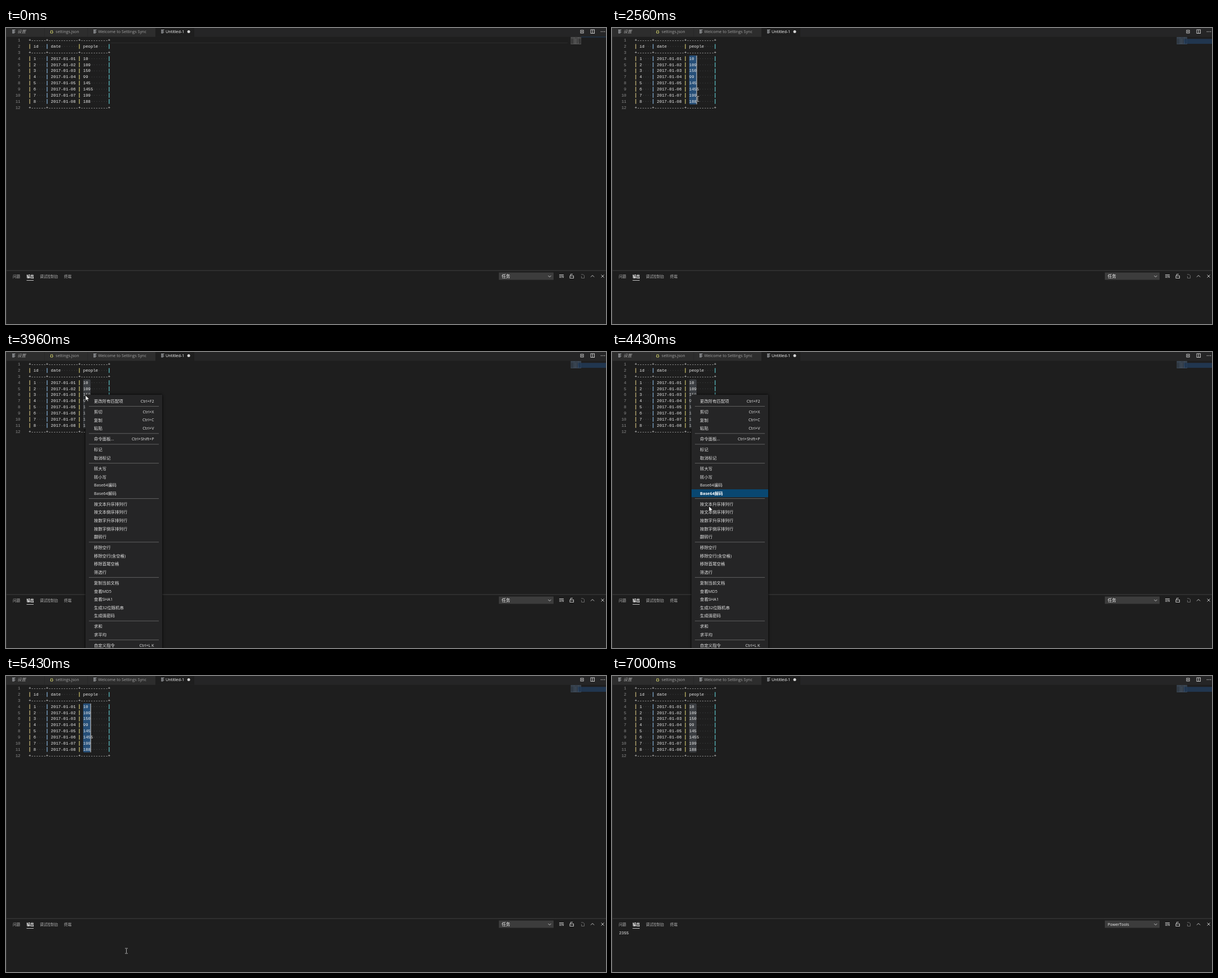
These frames come from a looping animation (1064x526 px, 7070 ms). An HTML page with a canvas:

```html
<!DOCTYPE html>
<html lang="zh-CN">
<head>
<meta charset="utf-8">
<title>Column sum</title>
<style>
html, body { margin: 0; width: 100%; height: 100%; overflow: hidden; background: #1e1e1e; }
canvas { display: block; }
</style>
</head>
<body>
<canvas id="stage" width="1064" height="526"></canvas>
<script>
const W = 1064, H = 526, LOOP = 7070;
const ctx = document.getElementById('stage').getContext('2d');
const UI = '"Open Sans", "Noto Sans CJK SC", "Noto Sans CJK", sans-serif';
const CODE = '7.33px "Liberation Mono", "DejaVu Sans Mono", monospace';
const ICON = '#c5c5c5';

const CELL = 4.4, ROW = 10.85, LEFT = 40, TOP = 16.3;
const SEL_COL = 22, SEL_ROW = 3;
const colX = c => LEFT + c * CELL;
const rowY = r => TOP + r * ROW;

const within = (t, a, b) => t >= a && t < b;
const clamp = (v, a, b) => Math.max(a, Math.min(b, v));

// Table text
const rule = '+------+------------+-----------+';
const record = (id, date, n) => `| ${id.padEnd(4)} | ${date.padEnd(10)} | ${n.padEnd(9)} |`;
const people = '10 109 150 99 145 1455 199 188'.split(' ');
const lines = [
  rule, record('id', 'date', 'people'), rule,
  ...people.map((n, i) => record(`${i + 1}`, `2017-01-0${i + 1}`, n)),
  rule
];
const PIPES = { 0: '#cdbb7c', 7: '#86b4dc', 20: '#d0c56e', 32: '#5fc8cc' };

// Context menu: one group per line, items split by commas, shortcut after a colon
const groups = `更改所有匹配项:Ctrl+F2
剪切:Ctrl+X,复制:Ctrl+C,粘贴:Ctrl+V
命令面板...:Ctrl+Shift+P
标记,取消标记
转大写,转小写,Base64编码,Base64解码
按文本升序排列行,按文本倒序排列行,按数字升序排列行,按数字倒序排列行,翻转行
移除空行,移除空行(含空格),移除首尾空格,筛选行
复制当前文档,查看MD5,查看SHA1,生成32位随机串,生成强密码
求和,求平均
自定义指令:Ctrl+L K`.split('\n').map(g => g.split(',').map(item => item.split(':')));
const ITEM = 14.55, GAP = 4.6;

// Pointer moves: start, end, then points evenly spaced in time
const STEP = 77;
const moves = [
  [70, 760, [1001, 517], [640, 300], [300, 120], [154, 58]],
  [840, 1060, [150, 57], [140, 53]],
  [1640, 1640, [143, 54]],
  [1780, 2330, [144, 60], [152, 124]],
  [2560, 2560, [152, 126]],
  [3100, 3320, [150, 120], [141, 82]],
  [3400, 3630, [141, 81], [141, 77]],
  [4200, 4430, [153, 196], [172, 274]],
  [4507, 4660, [181, 318], [199, 408]],
  [4740, 4890, [203, 416], [212, 483]],
  [4970, 4970, [212, 486]],
  [5430, 5430, [213.5, 488.5]],
  [5670, 6360, [205, 484], [141, 455], [520, 484], [1016, 513]],
  [6440, 6440, [1030, 519]]
];

function pointer(t) {
  const move = moves.filter(m => t >= m[0]).pop();
  if (!move) return null;
  const [start, end, ...points] = move;
  const steps = Math.round((end - start) / STEP);
  const step = steps && Math.floor((t - start) / (end - start) * steps + 0.1);
  const u = steps && Math.min(1, step / steps) * (points.length - 1);
  const i = Math.floor(u), a = points[i], b = points[i + 1] || a;
  return { x: a[0] + (b[0] - a[0]) * (u - i), y: a[1] + (b[1] - a[1]) * (u - i) };
}

function box(x, y, w, h, color) {
  ctx.fillStyle = color;
  ctx.fillRect(x, y, w, h);
}

function text(str, x, y, color, font, align = 'left') {
  ctx.font = font;
  ctx.fillStyle = color;
  ctx.textAlign = align;
  ctx.fillText(str, x, y);
}

function label(str, x, y, color, size, style = '') {
  text(str, x, y, color, `${style} ${size}px ${UI}`);
}

function stroke(points, color = ICON) {
  ctx.beginPath();
  points.forEach(([x, y]) => ctx.lineTo(x, y));
  ctx.strokeStyle = color;
  ctx.lineWidth = 1;
  ctx.stroke();
}

function frame(x, y, w, h) {
  ctx.strokeStyle = ICON;
  ctx.lineWidth = 1;
  ctx.strokeRect(x, y, w, h);
}

function dot(x, y, r, color) {
  ctx.beginPath();
  ctx.arc(x, y, r, 0, Math.PI * 2);
  ctx.fillStyle = color;
  ctx.fill();
}

function cross(x, y, r) {
  stroke([[x - r, y - r], [x + r, y + r]]);
  stroke([[x + r, y - r], [x - r, y + r]]);
}

function chevron(x, y, r) {
  stroke([[x - Math.abs(r), y - r / 2], [x, y + r / 2], [x + Math.abs(r), y - r / 2]]);
}

function bars(x, y, w) {
  for (let i = 0; i < 4; i++) box(x, y + i * 1.8, w - (i % 2) * 1.5, 1, '#b8bcc0');
}

function drawTabs() {
  box(0, 0, W, 15.7, '#252526');
  box(1, 0, 264, 15.7, '#2d2d2d');
  [68, 144.5].forEach(x => box(x, 0, 0.6, 15.7, '#252526'));
  box(265, 0, 69, 15.7, '#1e1e1e');
  [11, 155, 275].forEach(x => bars(x, 3, 5.5));
  label('设置', 20, 9.2, '#a2a2a2', 7.6, 'italic');
  label('{}', 78, 9, '#cbcb6a', 7.6, 'bold');
  label('settings.json', 88, 9.2, '#a2a2a2', 7.1);
  label('Welcome to Settings Sync', 163.5, 9.2, '#a2a2a2', 7.2);
  label('Untitled-1', 283, 9.2, '#ffffff', 7.2);
  dot(324, 6.4, 2.5, '#d4d4d4');

  frame(1019, 4, 5, 5);
  box(1020, 6, 3, 1, ICON);
  frame(1037, 3, 6.5, 6.5);
  stroke([[1040.2, 3], [1040.2, 9.5]]);
  for (let i = 0; i < 3; i++) dot(1055.5 + i * 3, 6.5, 0.8, ICON);
}

// Column selection, counted from the first record of the people column
function selection(t) {
  if (t < 1640) return null;
  const p = pointer(Math.min(t, 2560));
  return {
    cols: clamp(Math.round((p.x - colX(SEL_COL)) / CELL), 0, 4),
    rows: clamp(Math.floor((p.y - rowY(SEL_ROW)) / ROW) + 1, 1, 8),
    focus: t < 3880 || within(t, 5430, 5520)
  };
}

function drawLine(line, r) {
  const y = rowY(r), base = y + 7.9;
  text(`${r + 1}`, 25.5, base, '#8c8c8c', CODE, 'right');
  [...line].forEach((ch, c) => {
    const x = colX(c);
    if (ch === '|') box(x + 1.5, y + 1.4, 1.2, 8.6, PIPES[c]);
    else if (ch !== ' ') text(ch, x, base, '#ececec', CODE);
    else if (line[c - 1] === ' ' || line[c + 1] === ' ') box(x + 1.8, y + 5.2, 0.9, 0.9, '#4d5053');
  });
}

function drawEditor(t) {
  const sel = selection(t);
  if (sel) {
    ctx.beginPath();
    ctx.roundRect(colX(SEL_COL), rowY(SEL_ROW), sel.cols * CELL, sel.rows * ROW, 1.8);
    ctx.fillStyle = sel.focus ? '#264f78' : '#3a3d41';
    ctx.fill();
  } else {
    box(186, 26, 810, 1, '#2c2c2c');
    box(1020, 15.5, 44, 1, '#1f3d5c');
  }
  lines.forEach(drawLine);
  if (within(t, 1540, 1640)) box(colX(33), rowY(0), 1.2, ROW, '#d8d8d8');
  if (within(t, 1640, 3250) || within(t, 5430, 5520)) {
    box(colX(SEL_COL + sel.cols) - 0.4, rowY(SEL_ROW), 1.1, sel.rows * ROW, '#c8c8c8');
  }
}

function drawMinimap(t) {
  const picked = t >= 2560;
  const ink = picked ? 'rgba(150,175,200,.22)' : 'rgba(212,212,212,.28)';
  box(1001.5, 16, 18.5, 13, picked ? '#2d3640' : '#343434');
  if (picked) box(1014, 19.3, 50, 8.8, '#21364f');
  lines.forEach((line, r) => [...line].forEach((ch, c) => {
    if (ch !== ' ') box(1001.5 + c * 0.56, 16.2 + r * 1.08, 0.56, 0.8, ink);
  }));
}

function drawPanel(t) {
  const done = t >= 5520;
  box(0, 430.5, W, 1, '#414141');
  label('问题', 12, 443.6, '#b4b4b4', 6.5);
  label('输出', 36.5, 443.6, '#ffffff', 6.5, 'bold');
  label('调试控制台', 60, 443.6, '#b4b4b4', 6.5);
  label('终端', 103, 443.6, '#b4b4b4', 6.5);
  box(36.5, 448, 12.5, 1, '#c0c0c0');
  box(874, 434.5, 97, 13, '#3c3c3c');
  label(done ? 'PowerTools' : '任务', 879, 443.9, '#f0f0f0', done ? 7.1 : 7.6);
  chevron(964, 441.3, 2.5);

  for (let i = 0; i < 3; i++) box(981, 438 + i * 2.3, i < 2 ? 8 : 4.5, 1, ICON);
  cross(987.7, 442.7, 1.2);
  frame(1000, 440.5, 6.5, 4);
  stroke([[1001.2, 440.5], [1001.2, 437.5], [1005, 437.5]]);
  stroke([[1020, 438], [1023.5, 438], [1025.5, 440], [1025.5, 444.5], [1020.5, 444.5], [1020.5, 441]], '#686868');
  chevron(1040, 441, -3);
  cross(1058, 441, 2.5);

  if (done) text('2355', 12.4, 458.6, '#ececec', CODE);
  if (within(t, 5520, 7000)) box(12, 450.5, 1.2, 11, '#aeafad');
}

function drawMenu(t) {
  const hot = pointer(t - STEP).y;
  ctx.save();
  ctx.shadowColor = '#000';
  ctx.shadowBlur = 4;
  box(141, 76, 136, H, '#252526');
  ctx.restore();
  let y = 87;
  groups.forEach((group, g) => {
    if (g) {
      box(147, y - 5.5, 124, 1, '#606060');
      y += GAP;
    }
    group.forEach(([name, keys]) => {
      const on = Math.abs(hot - y) < ITEM / 2;
      const color = on ? '#ffffff' : '#e4e4e4';
      if (on) box(141, Math.round(y - 7), 136, 14, '#094771');
      label(name, 156, y + 2.8, color, 7.4, on ? 'bold' : '');
      if (keys) text(keys, 262.5, y + 2.7, color, `7.2px ${UI}`, 'right');
      y += ITEM;
    });
  });
}

function drawArrow({ x, y }) {
  ctx.beginPath();
  [[0, 0], [0, 9.3], [2.2, 7.4], [3.7, 10.8], [5.1, 10.2], [3.7, 6.9], [6.6, 6.7]]
    .forEach(([dx, dy]) => ctx.lineTo(x + dx, y + dy));
  ctx.closePath();
  ctx.fillStyle = '#fff';
  ctx.fill();
  ctx.strokeStyle = '#111';
  ctx.lineWidth = 0.6;
  ctx.stroke();
}

// The text cursor inverts what lies below it
function drawBeam({ x, y }) {
  ctx.save();
  ctx.globalCompositeOperation = 'difference';
  box(x - 0.5, y - 4, 1, 8, '#c8c8c8');
  [-5, 4].forEach(dy => box(x - 2.5, y + dy, 5, 1, '#c8c8c8'));
  ctx.restore();
}

function drawPointer(t) {
  if (!within(t, 70, 6530)) return;
  const p = pointer(t);
  const pressed = within(t, 1540, 2560) || within(t, 3800, 3960) || within(t, 5360, 5430);
  if (pressed) dot(p.x - 1.5, p.y - 1, 7, 'rgba(255,240,0,.62)');
  (within(t, 3880, 5430) ? drawArrow : drawBeam)(p);
}

function draw(t) {
  box(0, 0, W, H, '#1e1e1e');
  drawTabs();
  drawEditor(t);
  drawMinimap(t);
  drawPanel(t);
  box(0, 0, 1, H, '#333333');
  if (within(t, 3880, 5430)) drawMenu(t);
  drawPointer(t);
}

const began = performance.now();
function tick() {
  draw((performance.now() - began) % LOOP);
  requestAnimationFrame(tick);
}
tick();
</script>
</body>
</html>
```
